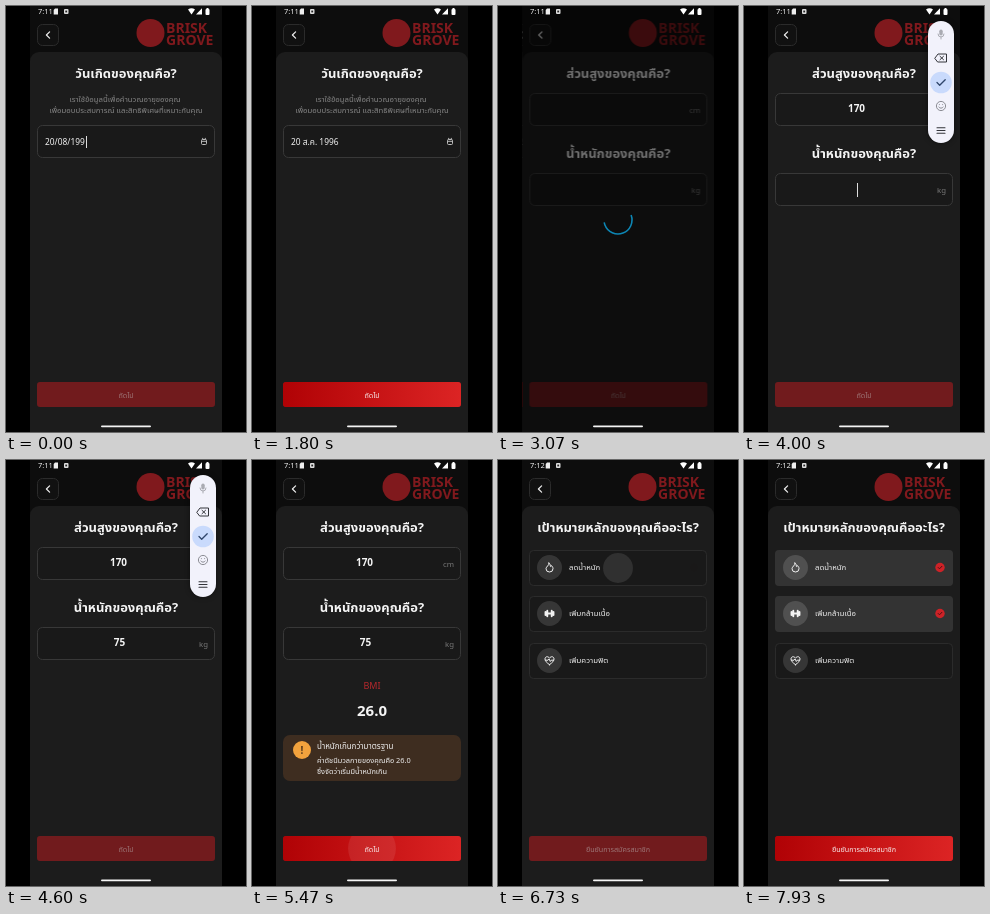
An HTML page with a canvas for the animation above (8000 ms loop, 240 px wide and 426 px high).

```html
<!DOCTYPE html>
<html lang="th">
<head>
<meta charset="utf-8">
<style>
html, body { margin: 0; width: 100%; height: 100%; overflow: hidden; background: #000; }
canvas { display: block; width: 240px; height: 426px; }
</style>
</head>
<body>
<canvas id="stage" width="240" height="426"></canvas>
<script>
const LOOP = 8000, LEFT = 24, RIGHT = 216, W = 240, H = 426;
const FONT = '"Noto Sans Thai", "Noto Sans", "Open Sans", sans-serif';
const screen2d = document.getElementById('stage').getContext('2d');
const layer = document.createElement('canvas');
layer.width = W;
layer.height = H;
const layer2d = layer.getContext('2d');
let c = screen2d;

const clamp = v => Math.max(0, Math.min(1, v));
const ramp = (t, start, length) => clamp((t - start) / length);
const between = (t, a, b) => t >= a && t < b;

function bezier(x1, y1, x2, y2) {
  const at = (a, b, s) => 3 * a * s * (1 - s) ** 2 + 3 * b * s * s * (1 - s) + s ** 3;
  return x => {
    let lo = 0, hi = 1;
    for (let i = 0; i < 20; i++) {
      const mid = (lo + hi) / 2;
      if (at(x1, x2, mid) < x) lo = mid; else hi = mid;
    }
    return at(y1, y2, lo);
  };
}
const fastOutSlowIn = bezier(.4, 0, .2, 1);
const slideHead = bezier(.3, 0, .8, .15);
const slideTail = bezier(.05, .7, .1, 1);
const slideEase = p => p < 1 / 6 ? .4 * slideHead(p * 6) : .4 + .6 * slideTail((p - 1 / 6) * 1.2);

function rect(x, y, w, h, r, fill, stroke) {
  c.beginPath();
  c.roundRect(x, y, w, h, r);
  if (fill) { c.fillStyle = fill; c.fill(); }
  if (stroke) { c.strokeStyle = stroke; c.lineWidth = 1; c.stroke(); }
}
function disc(x, y, r, fill) {
  c.beginPath();
  c.arc(x, y, r, 0, 7);
  c.fillStyle = fill;
  c.fill();
}
function ring(x, y, r, color, width = 1) {
  c.beginPath();
  c.arc(x, y, r, 0, 7);
  c.strokeStyle = color;
  c.lineWidth = width;
  c.stroke();
}
function path(d, x, y, color, width = 1, filled = false) {
  c.save();
  c.translate(x, y);
  c.lineCap = c.lineJoin = 'round';
  c.lineWidth = width;
  c.strokeStyle = c.fillStyle = color;
  if (filled) c.fill(new Path2D(d)); else c.stroke(new Path2D(d));
  c.restore();
}
function text(str, x, y, size, color = '#f4f4f4', weight = 400, align = 'center') {
  c.font = `${weight} ${size}px ${FONT}`;
  c.textAlign = align;
  c.textBaseline = 'alphabetic';
  c.fillStyle = color;
  c.fillText(str, x, y);
}
function faded(alpha, draw) {
  if (alpha <= 0) return;
  c.save();
  c.globalAlpha *= alpha;
  draw();
  c.restore();
}

const title = (str, y) => text(str, 120, y, 13, '#f4f4f4', 600);
const field = y => rect(31.5, y + .5, 177, 32, 5, '#191919', '#383838');
const caret = (x, y, h) => { c.fillStyle = '#ddd'; c.fillRect(x, y, 1, h); };

function button(label, active) {
  rect(31, 376, 178, 25, 3, '#711b1d');
  text(label, 120, 391.5, 7.2, '#9c7475');
  faded(active, () => {
    const g = c.createLinearGradient(31, 0, 209, 0);
    g.addColorStop(0, '#b00205');
    g.addColorStop(1, '#dc2424');
    rect(31, 376, 178, 25, 3, g);
    text(label, 120, 391.5, 7.2, '#f7e9e9');
  });
}
function pressed(y, h, t, start) {
  const p = ramp(t, start, 400);
  if (p <= 0 || p >= 1) return;
  c.save();
  c.beginPath();
  c.roundRect(31, y, 178, h, 4);
  c.clip();
  disc(120, y + h / 2, 15 + 90 * fastOutSlowIn(p), `rgba(255,255,255,${.1 * (1 - p)})`);
  c.restore();
}

function shell() {
  c.fillStyle = '#0d0d0d';
  c.fillRect(LEFT, 0, RIGHT - LEFT, H);
  rect(LEFT, 46, RIGHT - LEFT, H - 46, [9, 9, 0, 0], '#1c1c1c');
  rect(31.5, 18.5, 21, 21, 5, '#111', '#2b2b2b');
  path('M1.6-3.2 -1.6 0 1.6 3.2', 42, 29, '#eee', 1.2);
  disc(144.5, 27, 14, '#80191d');
  text('BRISK', 160, 27, 14, '#80191d', 800, 'left');
  text('GROVE', 160, 39, 14, '#80191d', 800, 'left');
}

function birthdayPage(t) {
  shell();
  title('วันเกิดของคุณคือ?', 72);
  text('เราใช้ข้อมูลนี้เพื่อคำนวณอายุของคุณ', 119, 96, 7.8, '#858585');
  text('เพื่อมอบประสบการณ์ และสิทธิพิเศษที่เหมาะกับคุณ', 120, 107, 7.8, '#858585');
  field(119);
  const value = t < 200 ? '20/08/199' : t < 1270 ? '20/08/1996' : '20 ส.ค. 1996';
  text(value, 39, 138.5, 8.4, '#f4f4f4', 500, 'left');
  if (t < 800) caret(t < 200 ? 80 : 85, 130, 12);
  rect(195.5, 133.5, 5, 5, 1, null, '#bbb');
  path('M-2.5 0H2.5M-1.3-3V-2M1.3-3V-2', 198, 135.3, '#bbb');
  button('ถัดไป', ramp(t, 1330, 300));
  pressed(376, 25, t, 2130);
}

function bodyPage(t) {
  shell();
  title('ส่วนสูงของคุณคือ?', 72);
  field(87);
  text('cm', 202, 107, 7.8, '#777', 400, 'right');
  title('น้ำหนักของคุณคือ?', 152);
  field(167);
  text('kg', 202, 187, 7.8, '#777', 400, 'right');
  if (t >= 3870) text(t < 3930 ? '17' : '170', 112.5, 106, 10, '#f4f4f4', 600);
  if (between(t, 3730, 3870)) caret(113, 96, 14);
  if (t >= 4530) text(t < 4600 ? '7' : '75', 113.5, 186, 10, '#f4f4f4', 600);
  if (between(t, 4000, 4530)) caret(113, 177, 14);
  faded(ramp(t, 4800, 350), () => {
    text('BMI', 120, 229, 9, '#b8282d');
    text('26.0', 120, 256, 15, '#f4f4f4', 600);
    rect(31, 275, 178, 46, 7, '#3e2d20');
    disc(50, 290, 9, '#f2a23d');
    text('!', 50, 293.5, 10, '#553719', 700);
    text('น้ำหนักเกินกว่ามาตรฐาน', 65, 289, 8, '#eee', 500, 'left');
    text('ค่าดัชนีมวลกายของคุณคือ 26.0', 65, 303, 7.4, '#eee', 400, 'left');
    text('ซึ่งจัดว่าเริ่มมีน้ำหนักเกิน', 65, 314, 7.4, '#eee', 400, 'left');
  });
  button('ถัดไป', ramp(t, 4800, 300));
  pressed(376, 25, t, 5400);
}

const goals = [
  { label: 'ลดน้ำหนัก', y: 90, at: 6730, icon: 'M-.5-4.5C0-2-3.5-1-3.5 1.2A3.5 3.3 0 0 0 3.5 1.2C3.5-.5 2.5-1.4 1.8-2C1.8-.8 1-.7 .8-1.2C.8-3 .3-4-.5-4.5Z' },
  { label: 'เพิ่มกล้ามเนื้อ', y: 136, at: 7200, icon: 'M-1.5 0H1.5M-2.2-2.7V2.7M2.2-2.7V2.7M-4-1.5V1.5M4-1.5V1.5', width: 1.9 },
  { label: 'เพิ่มความฟิต', y: 183, at: Infinity, icon: 'M0 4.2C-3 2-4.5.4-4.5-1.5C-4.5-4-1.5-4.7 0-2.3C1.5-4.7 4.5-4 4.5-1.5C4.5.4 3 2 0 4.2ZM-4-.3H-1.5L-.4-1.6L.8 1L1.7-.3H4' }
];
function goalRow({ label, y, at, icon, width }, t) {
  const mid = y + 17.5, on = ramp(t, at, 200);
  rect(31.5, y + .5, 177, 35, 4, '#191919', '#2b2b2b');
  disc(51.5, mid, 12.5, '#363636');
  faded(on, () => {
    rect(31, y, 178, 36, 4, '#333');
    disc(51.5, mid, 12.5, '#505050');
    disc(196, mid, 4.7, '#cd2227');
    path('M-1.8 0 -.5 1.3 1.9-1.2', 196, mid, '#4a1013', 1);
  });
  path(icon, 51.5, mid, '#f2f2f2', width || 1);
  text(label, 71, mid + 2.6, 7.8, '#eee', 400, 'left');
  pressed(y, 36, t, at);
}
function goalPage(t) {
  shell();
  title('เป้าหมายหลักของคุณคืออะไร?', 72);
  goals.forEach(goal => goalRow(goal, t));
  button('ยืนยันการสมัครสมาชิก', ramp(t, 6750, 300));
}

function keyToolbar(t) {
  faded(Math.min(ramp(t, 3730, 140), 1 - ramp(t, 4660, 140)), () => {
    c.save();
    c.shadowColor = 'rgba(0,0,0,.5)';
    c.shadowBlur = 5;
    rect(184, 15, 26, 122, 13, '#f2f2fb');
    c.restore();
    rect(195.3, 23.5, 3.4, 6, 1.7, '#aaabb2');
    path('M-3 0A3 3 0 0 0 3 0M0 3V5', 197, 28, '#aaabb2');
    path('M-6 0 -3-4H5.5V4H-3ZM-1-1.7 2.5 1.7M2.5-1.7 -1 1.7', 197, 52, '#33343a');
    disc(197, 76.5, 10.8, '#c9dafc');
    path('M-4 0 -1.3 2.7 4.2-2.8', 197, 76.5, '#30466b', 1.3);
    ring(197, 100, 4.6, '#8c8d94');
    path('M-2.2 1A2.5 2.2 0 0 0 2.2 1M-1.6-1.4V-1.3M1.6-1.4V-1.3', 197, 100, '#8c8d94');
    path('M-4-2.7H4M-4 0H4M-4 2.7H4', 197, 124.5, '#33343a', 1.1);
  });
}

function statusBar(t) {
  text(t < 5960 ? '7:11' : '7:12', 32, 8.3, 7.5, '#eee', 400, 'left');
  path('M-1-3H2V3H-2.3V-1.6Z', 50, 5.5, '#eee', .5, true);
  rect(58, 3, 4.5, 5, 1, '#ddd');
  rect(59.3, 4.6, 1.8, 1.8, 0, '#222');
  path('M-3.5-2Q0-4.5 3.5-2L0 3Z', 185.5, 5.5, '#fff', .5, true);
  path('M3-3.3V3H-3Z', 193, 5.5, '#fff', .5, true);
  rect(199.5, 3, 4, 6, 1, '#fff');
  rect(200.5, 2, 2, 1, 0, '#fff');
  rect(95, 419.4, 50, 1.9, 1, '#f4f4f4');
}

function spinner(elapsed) {
  const cycle = elapsed % 1333 / 1333;
  const head = fastOutSlowIn(clamp(cycle * 2)), tail = fastOutSlowIn(clamp(cycle * 2 - 1));
  const start = Math.PI * (-.5 + 1.5 * tail + 2 * elapsed / 2222 + .5 * cycle);
  c.beginPath();
  c.arc(120, 214, 14, start, start + Math.max(1.5 * Math.PI * (head - tail), .02));
  c.strokeStyle = '#0d86b4';
  c.lineWidth = 1.6;
  c.stroke();
}
function loader(t, { show, slide, hide, end }) {
  if (!between(t, show, end)) return;
  const alpha = Math.min(ramp(t, show, 150), 1 - ramp(t, hide, end - hide));
  c.fillStyle = `rgba(0,0,0,${.54 * alpha})`;
  c.fillRect(LEFT, 0, RIGHT - LEFT, H);
  faded(alpha, () => spinner(t - (t < slide ? show : slide)));
}

const steps = [
  { show: 2200, slide: 2770, hide: 3080, end: 3200, from: birthdayPage, to: bodyPage },
  { show: 5500, slide: 5984, hide: 6270, end: 6400, from: bodyPage, to: goalPage }
];
function place(page, t, dx, alpha = 1) {
  c = layer2d;
  c.clearRect(0, 0, W, H);
  page(t);
  c = screen2d;
  faded(alpha, () => c.drawImage(layer, dx, 0));
}
function pages(t) {
  const step = t < 4000 ? steps[0] : steps[1];
  const p = ramp(t, step.slide, 450);
  if (p <= 0) return place(step.from, t, 0);
  if (p >= 1) return place(step.to, t, 0);
  const e = slideEase(p), travel = (RIGHT - LEFT) * .1;
  c.fillStyle = '#fff';
  c.fillRect(LEFT, 0, RIGHT - LEFT, H);
  place(step.from, t, -travel * e);
  place(step.to, t, travel * (1 - e), ramp(t, step.slide + 50, 83));
}

function draw(t) {
  c = screen2d;
  c.fillStyle = '#000';
  c.fillRect(0, 0, W, H);
  c.save();
  c.beginPath();
  c.rect(LEFT, 0, RIGHT - LEFT, H);
  c.clip();
  pages(t);
  steps.forEach(step => loader(t, step));
  c.restore();
  keyToolbar(t);
  statusBar(t);
}

const origin = performance.now();
function tick() {
  draw((performance.now() - origin) % LOOP);
  requestAnimationFrame(tick);
}
tick();
</script>
</body>
</html>
```
